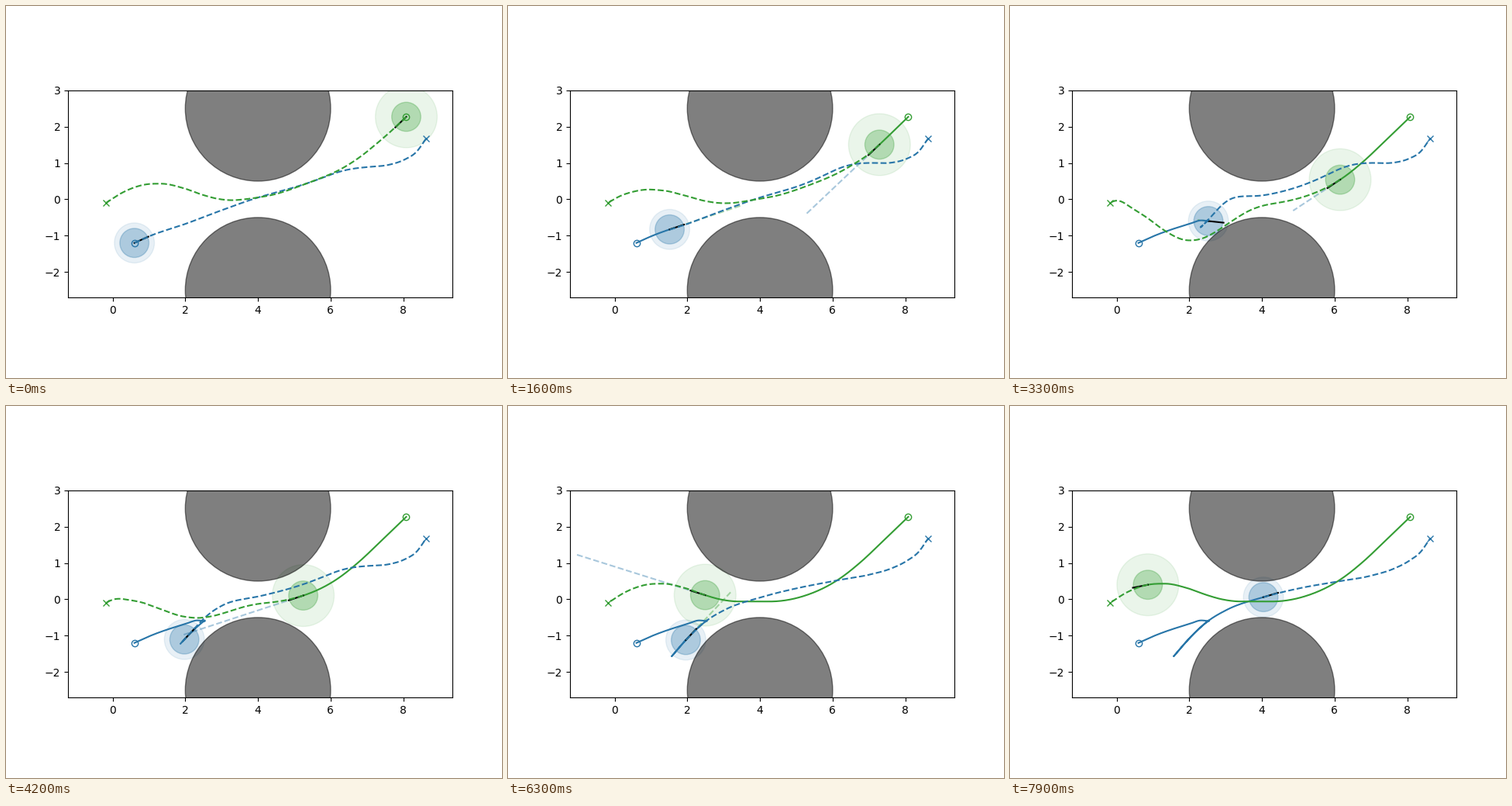
These frames come from a looping animation (640 px wide and 480 px high, 8 s). A matplotlib script:

```python
import numpy as np
import matplotlib.pyplot as plt
from matplotlib.animation import FuncAnimation

FRAMES, INTERVAL = 80, 100
BLUE, GREEN = "#2775a8", "#339d33"
RADIUS = 0.4
KEYS = [0, 9, 23, 33, 50, 63, 79]
REPLAN, CUSP, RESUME = 30, 34.5, 48  # blue decides to yield, backs up, drives on
PASSED = 70  # from here on the robots no longer predict each other


def curve(points):
    """Smooth function through points, flat where the values turn."""
    xs, ys = np.array(sorted(points), float).T
    slopes = np.gradient(ys, xs)
    steps = np.diff(ys)
    slopes[1:-1][steps[1:] * steps[:-1] <= 0] = 0

    def f(x):
        i = np.clip(np.searchsorted(xs, x, side="right") - 1, 0, len(xs) - 2)
        h = xs[i + 1] - xs[i]
        s = (x - xs[i]) / h
        return ((1 + 2 * s) * (1 - s)**2 * ys[i] + s * (1 - s)**2 * h * slopes[i]
                + s * s * (3 - 2 * s) * ys[i + 1] - s * s * (1 - s) * h * slopes[i + 1])

    return f


def bell(x, center, width):
    return np.exp(-((x - center) / width)**2)


class Robot:
    """Drives along lead(x), later route(x), while its plan sways around it."""

    def __init__(self, ax, color, other, margin, side, goal, x, route, sways, reach,
                 lead=None, lane=None):
        self.x, self.route, self.side, self.goal = x, route, side, goal
        self.sways, self.reach = sways, reach
        self.lead, self.lane = lead or route, lane or route

        start = self.at(0)
        self.discs = [ax.add_patch(plt.Circle(start, r, color=color, alpha=a))
                      for r, a in ((margin, 0.1), (RADIUS, 0.3))]
        self.ahead, = ax.plot([], [], "--", color=other, alpha=0.4, zorder=2)
        self.trail, = ax.plot([], [], color=color, zorder=2.1)
        self.nose, = ax.plot([], [], color="k", zorder=2.2)
        self.plan, = ax.plot([], [], "--", color=color, zorder=2.3)
        ax.plot(*start, "o", color=color, fillstyle="none", zorder=3)
        ax.plot(goal, route(goal), "x", color=color, zorder=3)

    def at(self, t):
        x = self.x(t)
        return np.array([x, np.where(t < CUSP, self.lead(x), self.route(x))])

    def heading(self, t):
        path = self.lead if t < CUSP else self.route
        x, e = self.x(t), 0.01
        slope = (path(x + e) - path(x - e)) / (2 * e)
        return self.side * np.array([1, slope]) / np.hypot(1, slope)

    def planned(self, t):
        x = turn = self.x(t)
        if self.lead is not self.route and REPLAN <= t < RESUME:
            turn = min(x, np.interp(t, [33, RESUME], [2.31, 1.57]))
        xs = np.r_[np.linspace(x, turn, 40), np.linspace(turn, self.goal, 200)]
        path = self.lane if t < REPLAN else self.route
        sway = sum(np.interp(t, KEYS, heights) * bell(xs, center, width)
                   for center, width, heights in self.sways)
        pinned = (1 - bell(xs, turn, 0.5)) * (1 - bell(xs, self.goal, 0.4))
        return xs, path(xs) + sway * pinned

    def update(self, t):
        pos, ahead = self.at(t), self.heading(t)
        for disc in self.discs:
            disc.center = pos
        self.nose.set_data(*zip(pos, pos + 1.05 * RADIUS * ahead))
        self.trail.set_data(*self.at(np.linspace(0, t, 4 * t + 2)))
        self.plan.set_data(*self.planned(t))
        self.ahead.set_data(*zip(pos, pos + np.interp(t, KEYS, self.reach) * ahead))
        self.ahead.set_visible(0 < t < PASSED)
        return [*self.discs, self.ahead, self.trail, self.nose, self.plan]


fig, ax = plt.subplots(figsize=(6.4, 4.8), dpi=100)
ax.set_aspect("equal")
ax.set_xlim(-1.227, 9.349)
ax.set_ylim(-2.7, 3)
for y in (2.5, -2.5):
    ax.add_patch(plt.Circle((4, y), 2, color="k", alpha=0.5, zorder=1.5))

approach = [(0.6, -1.2), (1, -1.02), (2.02, -0.67)]
passage = [(3.03, -0.29), (4.04, 0.06), (5.06, 0.31), (6.02, 0.48), (7, 0.65),
           (7.62, 0.84), (8.05, 1.06), (8.37, 1.31), (8.62, 1.665)]

blue = Robot(
    ax, BLUE, GREEN, margin=0.55, side=1, goal=8.62,
    x=curve([(0, 0.6), (4, 0.69), (9, 0.99), (23, 2.02), (CUSP, 2.54),
             (RESUME, 1.57), (56, 1.76), (63, 1.96), (71, 2.63), (79, 4.04)]),
    route=curve([(1.57, -1.57), (1.96, -1.12), (2.5, -0.61)] + passage),
    lead=curve(approach + [(2.33, -0.58), (2.54, -0.6)]),
    lane=curve(approach + passage),
    sways=[(6.6, 1.1, [0.27, 0.65, 0.15, 0.4, 0.22, 0.03, 0]),
           (3, 0.8, [0, 0, 0, 0.27, 0, 0, 0])],
    reach=[0, 3.23, 0.9, -0.3, 0.04, 1.8, 0])

green = Robot(
    ax, GREEN, BLUE, margin=0.85, side=-1, goal=-0.19,
    x=curve(zip(KEYS, [8.08, 7.72, 6.8, 6.15, 4.27, 2.49, 0.86])),
    route=curve([(8.08, 2.27), (7.26, 1.48), (6.8, 1.05), (6.15, 0.54), (5.17, 0.08),
                 (4.27, -0.06), (3.44, -0.06), (2.9, 0), (2.49, 0.115), (1.97, 0.3),
                 (1.33, 0.43), (0.86, 0.4), (0.3, 0.2), (-0.19, -0.105)]),
    sways=[(1.8, 1.4, [0, -0.88, 0.46, -1.45, -0.2, 0, 0]),
           (5.4, 1.4, [0.3, 0.33, 0.17, 0, 0, 0, 0])],
    reach=[0, 3.42, 2.2, 1.55, 5.3, 3.7, 3])


def update(frame):
    return blue.update(frame) + green.update(frame)


anim = FuncAnimation(fig, update, frames=FRAMES, interval=INTERVAL,
                     init_func=lambda: update(0), repeat=True, repeat_delay=0)
plt.show()
```
